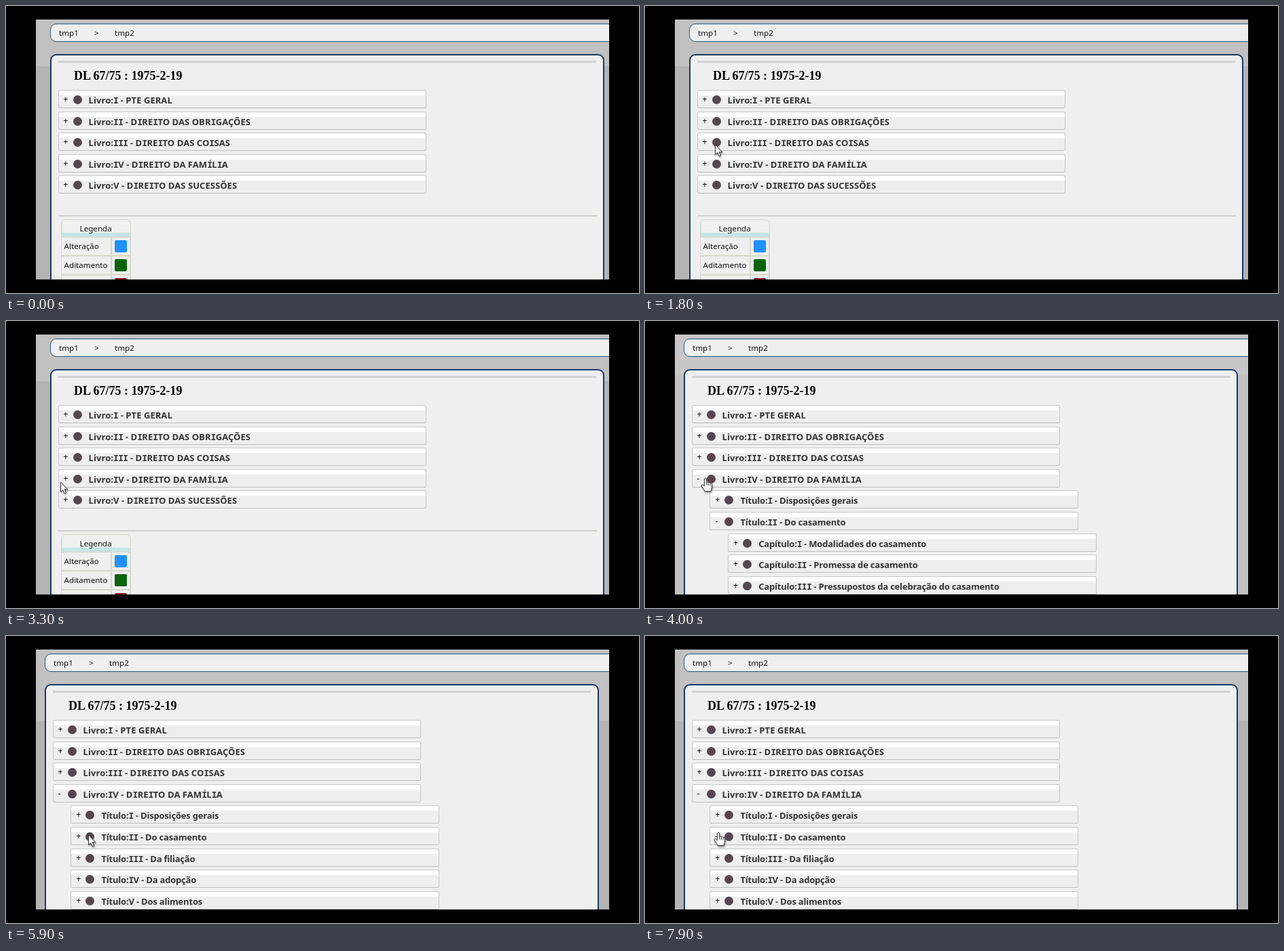
Write an HTML page that moves like this. It is 932 px wide and 424 px high and loops after 8000 ms.

```html
<!DOCTYPE html>
<html lang="pt">
<head>
<meta charset="utf-8">
<title>DL 67/75</title>
<style>
  html, body { margin: 0; width: 100%; height: 100%; overflow: hidden; background: #000; }
  * { box-sizing: border-box; }
  body { position: relative; font: 11.6px/16px "Noto Sans", sans-serif; color: #111; }
  #view { position: absolute; left: 44px; top: 20px; width: 844px; height: 384px; overflow: hidden; }
  #page { position: absolute; left: -44px; top: -20px; width: 932px; height: 424px; }
  #page > *, #rest > *, .row > *, #menu, svg { position: absolute; }
  .bar { left: 65px; top: 26px; width: 860px; height: 27px; border: 1px solid #245a7c;
         border-radius: 9px; background: #efefef; }
  .bar span { position: absolute; top: 5px; }
  .panel { left: 65px; top: 71px; width: 816px; height: 420px; border: 2px solid #173a66;
           border-radius: 9px; background: #efefef; }
  .rule { left: 77px; top: 81px; width: 792px; height: 3px; background: #d2d2d2; }
  h1 { margin: 0; left: 100px; top: 93px; font: bold 18px/20px "Liberation Serif", serif; color: #000; white-space: nowrap; }
  #tree { left: 76.6px; top: 124px; width: 542.6px; }
  .row { position: relative; width: 542.6px; height: 27px; margin-bottom: 4.6px;
         border: 1px solid #c8c8c8; border-bottom-color: #bdbdbd; border-radius: 3px;
         background: linear-gradient(#fff 7px, #eee 7px); white-space: nowrap;
         font-weight: bold; font-size: 13px; line-height: 27px; color: #333; }
  .row .sign { left: 7px; top: -1px; font-weight: 400; font-size: 12px; color: #000; }
  .row .dot { left: 21px; top: 7px; width: 13px; height: 13px; border-radius: 50%; background: #54474f; }
  .row .name { left: 44px; top: 1px; letter-spacing: -.19px; }
  .book > .name { letter-spacing: .06px; }
  .name b { font-family: "DejaVu Sans Mono", monospace; line-height: 0; letter-spacing: -.7px; }
  .row.on { background: #fff; color: #3ba6d9; }
  .row.on .dot { background: #6e666b; }
  .kids { padding-left: 26.8px; width: 640px; overflow: hidden; }
  #rest { position: relative; height: 200px; }
  #rest .line { left: 0; top: 27.4px; width: 793px; height: 1.5px; background: #d0d0cf; }
  .head { left: 4px; top: 33px; width: 103px; height: 27px; border: 1px solid #d5d2c8; border-radius: 7px 7px 0 0;
          background: #f0f0ee; box-shadow: inset 1px -6px #c6e5e5; padding: 5px 0 0 27px; }
  .grid { left: 4px; top: 60px; width: 103px; display: grid; grid-template-columns: 72px 26px; grid-auto-rows: 26px;
          gap: 2px; padding: 0 1px; background: #d9d6cd; }
  .grid div { background: #efefef; padding: 5px 0 0 4px; white-space: nowrap; }
  .grid i { display: block; width: 18px; height: 18px; margin-top: -1px; border-radius: 2px; }
  #menu { width: 148px; height: 52px; padding: 0 8px 0 0; border: 2px solid #565656; border-radius: 7px;
          background: #7a7a7a; color: #fff; font-weight: bold; font-size: 13px; line-height: 24px; text-align: center; }
  svg { left: 0; top: 0; overflow: visible; filter: drop-shadow(1px 2px 1px rgba(0,0,0,.4)); }
  svg path { fill: #fff; stroke: #333; stroke-linejoin: round; }
</style>
</head>
<body>
<div id="view">
  <div id="page">
    <div class="bar"><span style="left:12px">tmp1</span><span style="left:64px">&gt;</span><span style="left:94px">tmp2</span></div>
    <div class="panel"></div>
    <div class="rule"></div>
    <h1>DL 67/75 : 1975-2-19</h1>
    <div id="tree"></div>
  </div>
</div>
<div id="menu">Criar LaTeX<br>Partilhar</div>
<svg id="arrow" width="14" height="21"><path d="M.5 0V14.5L3.8 11.6 6.2 17 8.4 16 6.1 10.8H10.8Z"/></svg>
<svg id="hand" width="18" height="23"><path d="M-1.6 11V1Q0-1.2 1.6 1V6.5Q3.2 5 4.2 7 6 5.8 7 7.8 9.3 7 9.5 9.5V14Q8.5 16 8 19.5H-1Q-1.6 17-6 12-6.3 9-3.8 10L-1.6 12Z"/><path d="M1.6 6.5V10.5M4.2 7.5V11M7 8.5V11.5"/></svg>
<script>
const LOOP = 8000, STEP = 100;
const $ = id => document.getElementById(id);

const books = ['I - PTE GERAL', 'II - DIREITO DAS OBRIGAÇÕES', 'III - DIREITO DAS COISAS',
  'IV - DIREITO DA FAMÍLIA', 'V - DIREITO DAS SUCESSÕES'];
const titles = ['I - Disposições gerais', 'II - Do casamento', 'III - Da filiação',
  'IV - Da adopção', 'V - Dos alimentos'];
const chapters = ['I - Modalidades do casamento', 'II - Promessa de casamento',
  'III - Pressupostos da celebração do casamento'];

function add(parent, cls, html = '') {
  const el = document.createElement('div');
  el.className = cls;
  el.innerHTML = html;
  return parent.appendChild(el);
}
// capital I is set in a face that gives it serifs
const serifI = text => text.replace(/[IÍ]+/g, '<b>$&</b>');
const addRow = (parent, kind, name, cls = '') => add(parent, 'row ' + cls,
  `<span class="sign">+</span><span class="dot"></span><span class="name">${kind}:${serifI(name)}</span>`);

const tree = $('tree'), rows = {};
let family, marriage;
books.forEach((name, i) => {
  rows['L' + (i + 1)] = addRow(tree, 'Livro', name, 'book');
  if (i === 3) family = add(tree, 'kids');
});
titles.forEach((name, i) => {
  rows['T' + (i + 1)] = addRow(family, 'Título', name);
  if (i === 1) marriage = add(family, 'kids');
});
chapters.forEach(name => addRow(marriage, 'Capítulo', name));

const rest = add(tree, '');
rest.id = 'rest';
add(rest, 'line');
add(rest, 'head', 'Legenda');
add(rest, 'grid', [['Alteração', '#1e90ff'], ['Aditamento', '#0a640a'], ['', '#8b1a1a']]
  .map(([label, c]) => `<div>${label}</div><div><i style="background:${c}"></i></div>`).join(''));

// time, x, y of the pointer tip
const path = [[700, 46, 221], [1200, 108, 272], [1500, 108, 272], [1800, 103, 205], [2400, 103, 167],
  [2700, 103, 167], [3000, 62, 205], [3100, 52, 228], [3200, 64, 243], [3300, 80, 238],
  [3400, 89, 232], [4400, 89, 232], [4600, 95, 240], [5300, 108, 292], [5600, 121, 294],
  [6300, 121, 294], [6600, 119, 273], [6900, 122, 265], [7100, 122, 265], [7300, 98, 276],
  [7400, 109, 286], [7500, 109, 286], [7600, 108, 290], [8000, 108, 290]];
const handTimes = [[3400, 4500], [7600, 8000]];
const hovers = [['L5', 1100, 1700], ['L3', 1900, 2200], ['L2', 2300, 3000], ['L4', 4500, 4700],
  ['T1', 4800, 5000], ['T2', 5100, 5500], ['T2', 6000, 6500], ['T1', 6700, 7300]];
// start, end, x, y
const menus = [[2400, 3000, 99, 176], [5900, 6500, 117, 303], [6700, 7300, 118, 274]];

const within = (t, a, b) => t >= a && t < b;
const swing = k => .5 - Math.cos(Math.PI * Math.min(1, Math.max(0, k))) / 2;

function pointerAt(t) {
  const i = Math.max(1, path.findIndex(p => p[0] > t));
  const [t0, x0, y0] = path[i - 1], [t1, x1, y1] = path[i];
  const k = (t - t0) / (t1 - t0);
  return [x0 + (x1 - x0) * k, y0 + (y1 - y0) * k];
}

// the backdrop's bands stretch with the height of the page
function backdrop(t) {
  const [edge, top, low] = t < 3500 ? [69, '#c1c1c1', '#b4b4b4']
    : t < 4100 ? [60, '#c7c7c7', '#c2c2c2'] : [105, '#c1c1c1', '#b4b4b4'];
  return `linear-gradient(${top} ${edge}px, ${low} ${edge}px)`;
}

function draw(t) {
  $('page').style.transform = t < 3500 ? '' : 'translateX(-8px)';
  $('view').style.background = backdrop(t);

  family.style.height = 440 * swing((t - 3400) / 500) + 'px';
  marriage.style.display = t < 4100 ? '' : 'none';
  const sign = (id, open) => rows[id].firstChild.textContent = open ? '-' : '+';
  sign('L4', t >= 3400);
  sign('T2', within(t, 3400, 4100) || t >= 7900);

  for (const id in rows)
    rows[id].classList.toggle('on', hovers.some(([h, a, b]) => h === id && within(t, a, b)));

  const open = menus.find(([a, b]) => within(t, a, b));
  const menu = $('menu').style;
  menu.opacity = open ? Math.min(.85, (t - open[0]) * .006, (open[1] - t) * .004) : 0;
  if (open) menu.transform = `translate(${open[2]}px, ${open[3]}px)`;

  const [x, y] = pointerAt(t);
  const hand = handTimes.some(([a, b]) => within(t, a, b));
  for (const id of ['arrow', 'hand']) {
    const s = $(id).style;
    s.visibility = t >= 700 && hand === (id === 'hand') ? 'visible' : 'hidden';
    s.transform = `translate(${Math.round(x)}px, ${Math.round(y)}px)`;
  }
}

let last = -1;
function tick() {
  const t = Math.floor(performance.now() % LOOP / STEP) * STEP;
  if (t !== last) draw(last = t);
  requestAnimationFrame(tick);
}
tick();
</script>
</body>
</html>
```
